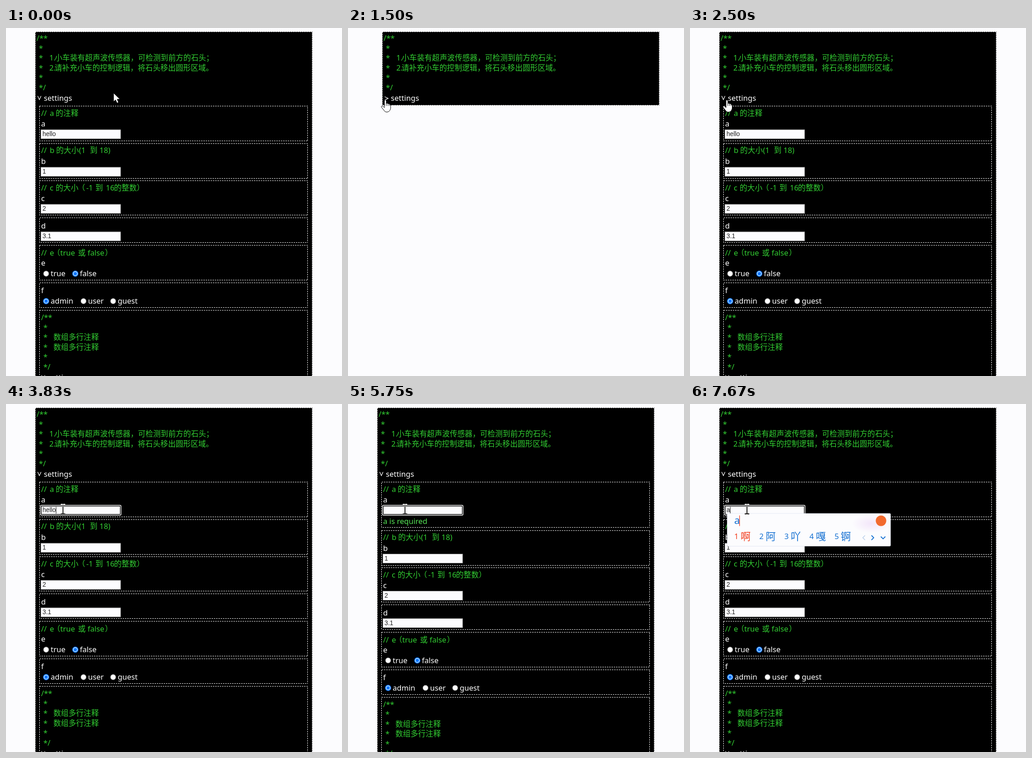
These frames come from a looping animation (737x760 px, 8 s). An HTML page:

```html
<!DOCTYPE html>
<html lang="zh-CN">
<head>
<meta charset="utf-8">
<style>
html, body { margin: 0; width: 100%; height: 100%; overflow: hidden; background: #fcfcfe; }
svg { display: block; }
text { font: 16.6px "Noto Sans", "Noto Sans CJK SC", "Noto Sans CJK", sans-serif; fill: #fff; white-space: pre; }
.note { fill: #32cd32; }
.error { fill: #55e055; }
.value { font: 13.9px "Liberation Sans", Arial, sans-serif; fill: #222; }
.dash { fill: none; stroke: #fff; stroke-dasharray: 3 2; shape-rendering: crispEdges; }
.line { fill: none; stroke: #fff; stroke-width: 1.3; }
.cursor { fill: #fff; stroke: #000; stroke-linejoin: round; }
#ime text { fill: #1470d2; font-size: 22px; }
#ime .digit { font-size: 16.6px; }
#ime .first { fill: #f23c1c; }
#beam { fill: none; stroke: #fff; stroke-width: 1.8; mix-blend-mode: difference; }
</style>
</head>
<body>
<svg id="stage" width="737" height="760" viewBox="0 0 737 760"></svg>
<script>
// Text on one baseline: pairs of x position and string.
const put = (y, cls, ...parts) => {
  let spans = '';
  for (let i = 0; i < parts.length; i += 2) spans += `<tspan x="${parts[i]}">${parts[i + 1]}</tspan>`;
  return `<text class="${cls}" y="${y}">${spans}</text>`;
};
const label = (x, y, s) => put(y, '', x, s);
const note = (y, ...parts) => put(y, 'note', 77, '//', ...parts);
const path = (d, extra = 'class="line"') => `<path d="${d}" ${extra}/>`;
const box = (y, h, id = '') => `<rect ${id} class="dash" x="73.5" y="${y}" width="588" height="${h}"/>`;
const input = (y, value) =>
  `<rect x="76.5" y="${y}" width="175" height="20" fill="#fcfcfe" stroke="#767676"/>` +
  put(y + 14, 'value', 80, value);
const radio = (x, y, s, checked) =>
  `<circle cx="${x}" cy="${y}" r="5.9" fill="#fff" stroke="${checked ? '#0075ff' : '#767676'}" stroke-width="${checked ? 1.6 : 1}"/>` +
  (checked ? `<circle cx="${x}" cy="${y}" r="3.8" fill="#0075ff"/>` : '') + label(x + 10, y + 5.5, s);
const block = (x, y, first, second) => {
  const row = (i, ...parts) => put(y + i * 21.5, 'note', ...parts);
  const star = [x + 5, '*'];
  return row(0, x, '/**') + row(1, ...star) + row(2, ...star, ...first) +
    row(3, ...star, ...second) + row(4, ...star) + row(5, x + 5, '*/');
};

const rest =
  box(252.5, 76) + note(273, 96, 'b', 110, '的大小', 160, '(1', 184, '到', 205, '18)') + label(77, 297, 'b') + input(304, '1') +
  box(333.5, 75) + note(355, 96, 'c', 109, '的大小', 157, '（', 176, '-1', 196, '到', 219, '16', 237, '的整数）') +
  label(77, 378, 'c') + input(385, '2') +
  box(414.5, 54) + label(77, 438, 'd') + input(445, '3.1') +
  box(474.5, 76) + note(497, 96, 'e', 102.5, '（', 119, 'true', 158, '或', 179, 'false', 217, '）') + label(77, 519, 'e') +
  radio(88, 536.5, 'true') + radio(152, 536.5, 'false', true) +
  box(556.5, 54) + label(77, 579, 'f') +
  radio(88, 596.5, 'admin', true) + radio(170, 596.5, 'user') + radio(235, 596.5, 'guest') +
  box(616.5, 300) + block(77, 638, [104, '数组多行注释'], [104, '数组多行注释']) +
  path('M78 758.5l3.7 8 3.7-8') + label(92, 769, 'settings');

const candidates = [...'啊阿吖嘎锕'].map((c, i) => {
  const x = 97 + i * 55, cls = i ? '' : 'first';
  return put(295, 'digit ' + cls, x, i + 1) + put(297, cls, x + 14, c);
}).join('');

stage.innerHTML = `
<radialGradient id="glow"><stop stop-color="#f3e6fa"/><stop offset="1" stop-color="#fcfcfe"/></radialGradient>
<rect width="737" height="760" fill="#fcfcfe"/>
<g id="panel">
  <rect id="back" x="64" y="8" width="608"/>
  <rect id="edge" class="dash" x="64.5" y="8.5" width="607" style="stroke-dasharray:2 2"/>
  ${block(67, 28, [95, '1.', 107, '小车装有超声波传感器，可检测到前方的石头；'],
    [95, '2.', 106.5, '请补充小车的控制逻辑，将石头移出圆形区域。'])}
  <path id="chevron" class="line"/>
  ${label(83, 159, 'settings')}
  <g id="fields">
    ${box(170.5, 76, 'id="boxA"')}
    ${note(192, 96, 'a', 109, '的注释')}
    ${label(77, 215, 'a')}
    ${input(222, '')}
    <g id="focus">
      <rect x="75.7" y="221.2" width="176.6" height="21.6" rx="2" stroke="#fff" stroke-width="1.5"/>
      <rect x="78" y="223.5" width="172" height="17" fill="#fcfcfe"/>
    </g>
    <text id="typed" class="value" x="80" y="236"></text>
    <rect id="caret" y="224.5" width="1" height="15"/>
    <g id="error">${put(262, 'error', 77, 'a is required')}</g>
    <g id="rest">${rest}</g>
  </g>
</g>
<g id="ime">
  <rect x="81.5" y="239" width="358.5" height="71.5" rx="2" fill="#fcfcfe" stroke="#d5dcec" stroke-width=".6"/>
  <rect x="355" y="240" width="84" height="42" fill="url(#glow)"/>
  ${put(262, '', 97, 'a')}
  <rect x="108" y="243.5" width="1.3" height="23" fill="#f23c1c"/>
  ${candidates}
  <circle cx="419" cy="255" r="11.5" fill="#f26a2e"/>
  ${path('M384 287l-5 5 5 5', 'fill="none" stroke="#b9cfea" stroke-width="1.5"')}
  ${path('M398 287l5 5-5 5M418.500 289.500l5 5 5-5', 'fill="none" stroke="#1470d2" stroke-width="1.8"')}
</g>
${path('M0 0V19L4.400 15 7.500 22 10.900 20.500 7.900 13.800 14 13.500Z', 'id="arrow" class="cursor"')}
<g id="hand" class="cursor">
  ${path('M-2 2Q-2 0 0 0T2 2V8.500Q2.300 7 4 7.200 5.800 7.500 5.800 9 6 8 7.500 8.200 9 8.500 9.200 10 11.500 9.500 11.600 12V17Q11.600 20 10 22.500 8 26.500 4 26.500H2Q-1 26.500-3 23L-8.500 16Q-9.500 14-7.800 13.300-6 13-4 15L-2 17Z')}
  ${path('M2 8.500V13M5.800 9V13M9.200 10V13', '')}
</g>
${path('M-5-11H-2Q0-11 0-9V8Q0 10-2 10H-5M5-11H2Q0-11 0-9M5 10H2Q0 10 0 8', 'id="beam"')}`;
document.querySelector('#hand path').removeAttribute('class');

const $ = id => document.getElementById(id);
const show = (id, on) => { $(id).style.display = on ? '' : 'none'; };
const lerp = (a, b, p) => a + (b - a) * p;
const progress = (k, from, steps) => Math.min(1, Math.max(0, (k - from + 1) / steps));
const LOOP = 8000, TICK = 1000 / 12;

function pointer(k) {
  if (k < 13) {
    const p = progress(k, 3, 10), ease = p * p * (3 - 2 * p);
    const x = lerp(236, 77, ease);
    return [x < 146 ? 'hand' : 'arrow', x, lerp(142, 157, ease)];
  }
  if (k < 18) return ['hand', lerp(77, 75.5, progress(k, 13, 2)), 157];
  if (k < 40) return ['hand', lerp(82, 81, progress(k, 22, 4)), 157];
  const p = progress(k, 40, 7);
  return [k < 45 ? 'arrow' : 'beam', lerp(81, 125, p), lerp(157, 230, p) + 98 * Math.sin(Math.PI * p)];
}

// The last entry whose tick has been reached.
const latest = (k, steps) => steps.filter(s => s[0] <= k).pop()[1];
const typing = [[0, 'hello'], [59, 'hell'], [62, 'hel'], [64, 'he'], [65, 'h'], [69, ''], [92, 'a']];
const blink = [[0, 0], [46, 1], [52, 0], [59, 1], [69, 0], [71, 1], [78, 0], [84, 1], [90, 0], [92, 1]];

function render(time) {
  const k = Math.floor((time % LOOP + 4) / TICK);
  const folded = k >= 18 && k < 30, invalid = k >= 69 && k < 92;

  $('panel').setAttribute('transform', `translate(${folded ? 11 : 0})`);
  $('back').setAttribute('height', folded ? 161 : 800);
  $('edge').setAttribute('height', folded ? 160 : 800);
  $('chevron').setAttribute('d', folded ? 'M69.500 150l7.500 3.700-7.500 3.700' : 'M69.500 148.500l3.700 8 3.700-8');
  show('fields', !folded);

  $('typed').textContent = latest(k, typing);
  $('caret').setAttribute('x', 80 + $('typed').getComputedTextLength());
  show('caret', latest(k, blink));
  show('focus', k >= 46);
  show('error', invalid);
  $('boxA').setAttribute('height', invalid ? 99 : 76);
  $('rest').setAttribute('transform', `translate(0 ${invalid ? 23.5 : 0})`);
  show('ime', k >= 92);

  const [kind, x, y] = pointer(k);
  for (const id of ['arrow', 'hand', 'beam']) show(id, id === kind);
  $(kind).setAttribute('transform', `translate(${x} ${y})`);
}

function loop() {
  render(performance.now());
  requestAnimationFrame(loop);
}
loop();
</script>
</body>
</html>
```
